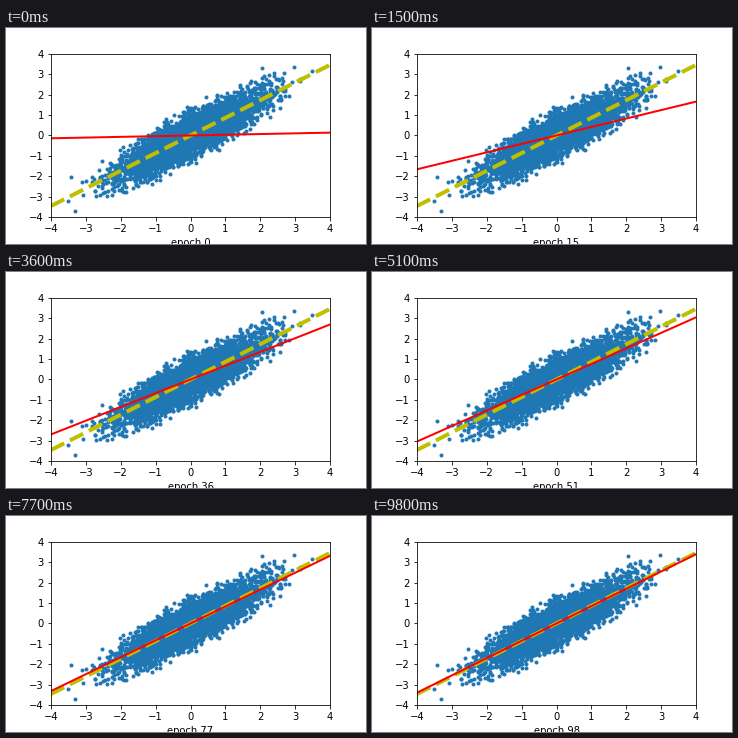
A matplotlib script that plays this animation: 360x216 px, repeating every 9.9 s.

```python
import numpy as np
import matplotlib.pyplot as plt
from matplotlib.animation import FuncAnimation

EPOCHS = 99
SLOPE = 0.865   # least-squares slope
NOISE = 0.48    # vertical spread around that line
DECAY = 0.96    # error left after each gradient step
TIPS = [(-3.43, -2.05), (-3.5, -3.2), (-3.3, -3.7),
        (2.05, 3.32), (2.97, 3.36), (3.49, 3.15)]


def make_cloud(count=5000, reach=3.25):
    """Correlated normal cloud inside an ellipse, plus its farthest points."""
    rng = np.random.default_rng(7)
    x, noise = rng.normal(size=(2, count))
    inside = np.hypot(x, noise) < reach
    y = SLOPE * x + NOISE * noise
    return np.vstack([np.column_stack([x, y])[inside], TIPS]).T


plt.rcParams["font.family"] = "DejaVu Sans"
fig, ax = plt.subplots(figsize=(5, 3), dpi=72, facecolor="white")
fig.subplots_adjust(left=0.125, right=0.9, bottom=0.125, top=0.88)

ends = np.array([-4, 4])
ax.plot(*make_cloud(), ".", color="C0")
ax.plot(ends, SLOPE * ends, "y--", lw=4)
fit, = ax.plot(ends, 0 * ends, "r-", lw=2)
ax.set(xlim=(-4, 4), ylim=(-4, 4), xticks=range(-4, 5), yticks=range(-4, 5))
label = ax.set_xlabel("epoch 0")


def draw(epoch):
    slope = SLOPE * (1 - DECAY ** (epoch + 1))
    fit.set_ydata(slope * ends)
    label.set_text(f"epoch {epoch}")
    return fit, label


anim = FuncAnimation(fig, draw, frames=EPOCHS, interval=100, repeat=True, blit=False)
plt.show()
```
